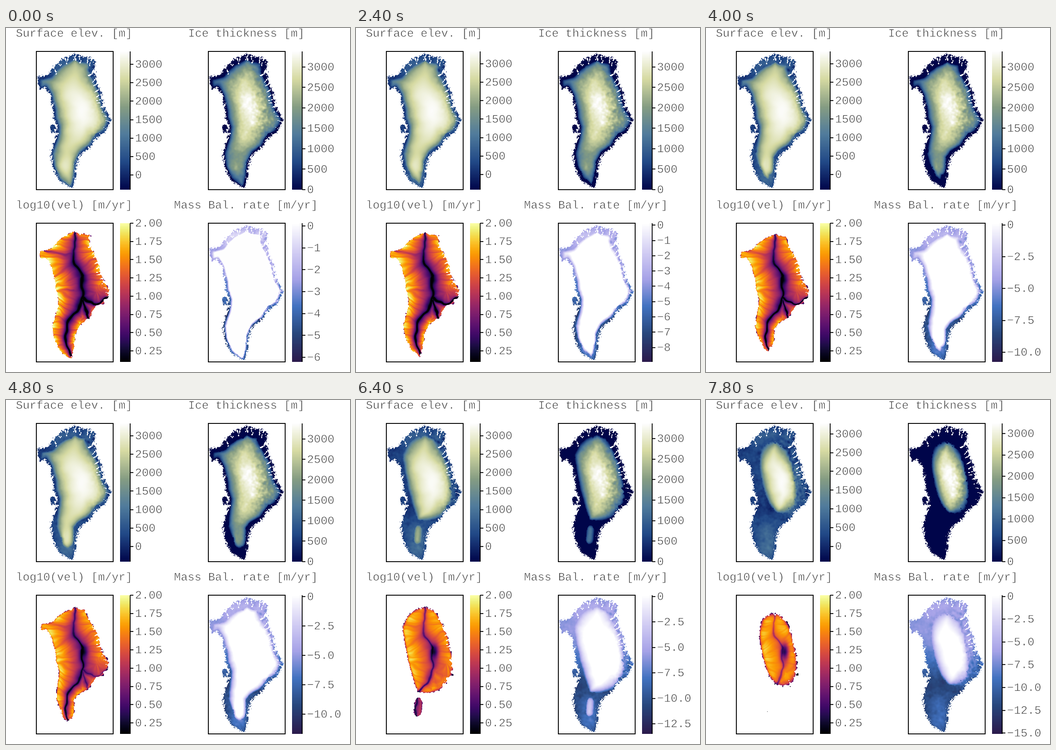
A matplotlib script for the animation above (8000 ms loop, 748 by 749 pixels).

```python
import numpy as np
import matplotlib.pyplot as plt
import matplotlib.patheffects as pe
from matplotlib.animation import FuncAnimation
from matplotlib.colors import LinearSegmentedColormap
from matplotlib.patches import Rectangle
from matplotlib.path import Path

WIDTH, HEIGHT, DPI = 748, 749, 64
FRAMES, INTERVAL = 40, 200
NX, NY = 167, 301
PT = 72 / DPI
INK = "#383838"
GLACIER = LinearSegmentedColormap.from_list("glacier", [
    "#00054a", "#214987", "#507b9c", "#869d83", "#d6daa2", "#fefefe"])
MELT = LinearSegmentedColormap.from_list("melt", [
    "#2c1a4c", "#28467b", "#4272c0", "#a7a3e8", "#d4cff4", "#ffffff"])

rng = np.random.default_rng(11)
X, Y = np.meshgrid(np.arange(NX) + 0.5, np.arange(NY) + 0.5)


# --- field helpers ----------------------------------------------------------
def trace(pts, x=X, y=Y):
    """Distance to a polyline and a coordinate running across its normals."""
    best, lane, run = np.full(X.shape, np.inf), np.zeros(X.shape), 0.0
    for (x0, y0), (x1, y1) in zip(pts, pts[1:]):
        dx, dy = x1 - x0, y1 - y0
        length = np.hypot(dx, dy)
        f = np.clip(((x - x0) * dx + (y - y0) * dy) / length**2, 0, 1)
        ex, ey = x - x0 - f * dx, y - y0 - f * dy
        d = np.hypot(ex, ey)
        q = run + f * length + 25 * np.arcsin(ey / (d + 1e-6)) + 37 * (ex > 0)
        lane = np.where(d < best, q, lane)
        best = np.minimum(best, d)
        run += length
    return best, lane


def inside(pts):
    """Signed distance to a polygon, positive inside."""
    d, _ = trace(pts + pts[:1])
    hit = Path(pts).contains_points(np.c_[X.ravel(), Y.ravel()])
    return np.where(hit.reshape(X.shape), d, -d)


def blur(a, sigma):
    fy, fx = np.fft.fftfreq(NY)[:, None], np.fft.fftfreq(NX)[None, :]
    kernel = np.exp(-2 * (np.pi * sigma) ** 2 * (fx**2 + fy**2))
    return np.fft.ifft2(np.fft.fft2(a) * kernel).real


def noise(sigma):
    n = blur(rng.standard_normal(X.shape), sigma)
    return n / n.std()


def bump(cx, cy, sx, sy):
    return np.exp(-((X - cx) / sx) ** 2 - ((Y - cy) / sy) ** 2)


def slope(v, start, end):
    return np.clip((v - start) / (end - start), 0, 1)


# --- land: a rough outline cut by random fjords in the north and east -------
coast = [(3, 56), (28, 49), (33, 38), (51, 19), (66, 13), (85, 3), (97, 10),
         (118, 14), (129, 20), (126, 42), (131, 64), (141, 88), (144, 108),
         (148, 122), (164, 148), (152, 172), (128, 191), (118, 209), (99, 222),
         (88, 243), (86, 270), (79, 297), (70, 297), (48, 280), (35, 252),
         (31, 222), (42, 188), (45, 165), (38, 145), (37, 128), (29, 96),
         (20, 80), (8, 82), (2, 68)]
island = 6 - np.hypot(X - 36, 0.6 * (Y - 167))
mainland = inside(coast)
depth = np.maximum(mainland, island)
shore = depth + 1.3 * noise(1.2) + 1.3 * noise(0.5)
for (x0, y0), (x1, y1) in zip(coast[2:15], coast[3:16]):
    for f in (0.25, 0.75):
        px, py = x0 + f * (x1 - x0), y0 + f * (y1 - y0)
        heading = np.arctan2(130 - py, 75 - px) + rng.normal(0, 0.3)
        reach = rng.uniform(8, 18)
        tip = (px + reach * np.cos(heading), py + reach * np.sin(heading))
        shore = np.minimum(shore, trace([(px, py), tip])[0] + 0.6 * noise(1))
land = shore > 0.7

north, south = slope(Y, 75, 35), slope(Y, 190, 250)
east = slope(X, 90, 125)

bed = (300 - 450 * bump(82, 115, 20, 60) + 600 * bump(128, 150, 20, 65)
       + 600 * bump(68, 262, 22, 45) + 350 * bump(60, 25, 60, 18)
       - 250 * bump(60, 180, 18, 22) + 60 * noise(5)
       + (55 + 140 * east) * noise(1.8))
bed *= 1 - 0.5 * np.exp(-np.clip(depth, 0, None) / 5)

# highest ice along the divide, with a second dome in the south
crest = (1900 + 1400 * np.exp(-((Y - 130) / 95) ** 2)
         + 700 * np.exp(-((Y - 252) / 25) ** 2))
ragged = 0.7 * noise(1) + (0.6 + 1.4 * east) * noise(2.5)

# --- divides and streams ----------------------------------------------------
warped = X + 2 * noise(6), Y + 2 * noise(6)
divide = [(89, 13), (79, 60), (80, 82), (102, 115), (102, 160), (84, 195),
          (70, 217), (66, 260), (74, 285)]
spurs = [[(102, 163), (122, 173), (140, 170), (156, 158)],
         [(103, 168), (108, 195), (116, 207)]]
ridge, lane = trace(divide, *warped)
spur = np.full(X.shape, np.inf)
for line in spurs:
    d_line, q_line = trace(line, *warped)
    lane = np.where(d_line < np.minimum(ridge, spur), q_line, lane)
    spur = np.minimum(spur, d_line)
streaks = (np.sin(0.2 * lane) + 0.7 * np.sin(0.47 * lane + 1)
           + 0.5 * np.sin(0.95 * lane + 2)) / 1.9
crease = (0.8 * np.exp(-(trace([(79, 70), (19, 63)], *warped)[0] / 3) ** 2)
          + 0.5 * np.exp(-(trace([(84, 145), (39, 143)], *warped)[0] / 2) ** 2))


def dome(t):
    """Tilted superellipse to which the ice sheet finally shrinks."""
    long, short = 87 - 10 * (t - 7), 42 - 7 * (t - 7)
    c, s = np.cos(0.2), np.sin(0.2)
    a, b = s * (X - 91) + c * (Y - 118), c * (X - 91) - s * (Y - 118)
    rho = (np.abs(a / long) ** 2.4 + np.abs(b / short) ** 2.4) ** (1 / 2.4)
    return (1 - rho) * short


def margin(t):
    """Signed distance to the ice edge and the radius of the southern lobe."""
    melt = min(1, (t / 4.8) ** 2)
    inset = mainland - 4 - 8 * north - melt * (1 + 7 * north + 13 * south)
    d = inset + (dome(t) - inset) * slope(t, 4.8, 7)
    gone = slope(t, 5.2, 7.2)
    r = 14 * (1 - gone) ** 0.5 - 0.5
    lobe = [(70, 200 + 50 * gone), (68, 257 - 4 * gone)]
    return np.maximum(d, r - trace(lobe)[0]), r


def fields(t):
    late = t / 7.8
    d, r = margin(t)
    ice = land & (d + ragged > 0)
    dm = np.clip(d + 1, 0, None) * ice
    fade = np.where(Y > 215, min(1, (max(r, 0) / 10) ** 2), 1)

    u = np.clip(blur(dm / (dm + ridge + 1), 1.5), 0, 1)
    p = np.sqrt(1 - (1 - u) ** 2) * (1 - np.exp(-dm / 3)) * fade
    thick = np.clip((crest * (1 - 0.015 * late**3) - bed) * p, 0, None)
    surf = bed + thick

    split = np.clip(np.minimum(ridge, spur + 30 * late**6) - 1.5, 0, None)
    w = split / (dm + split + 0.5)
    floor = 0.3 * slope(Y, 100, 60) + 0.9 * late**3
    vel = floor + (1.8 - floor) * w ** (0.55 - 0.2 * late**2)
    vel += (0.4 - 0.2 * late) * streaks * w**1.5 - 0.2 * east * w
    vel -= crease * w * (1 - 0.8 * late) + 0.9 * late**2 * bump(106, 123, 8, 20)
    vel *= (1 - np.exp(-(dm + 0.3) / (0.5 + 1.8 * late**2))) * fade

    warm = slope(Y, 90, 200)
    line = 1000 + 210 * t + 350 * warm
    rate = np.minimum(0.1, (surf - line) * (0.0028 + 0.0016 * warm))
    return [np.where(land, surf, np.nan), np.where(land, thick, np.nan),
            np.where(ice, np.clip(vel, 0.1, 2), np.nan),
            np.where(land, rate, np.nan)]


def limits(t):
    dip, thin = 13 * slope(t, 1.2, 2.4), (t / 7.8) ** 12
    return [(-398 - dip, 3349 - dip - 54 * thin), (0, 3382 - 145 * thin),
            (0.1, 2.0), (-6.21 - 1.138 * t, 0.128)]


# --- stage ------------------------------------------------------------------
fig = plt.figure(figsize=(WIDTH / DPI, HEIGHT / DPI), dpi=DPI, facecolor="white")
ax = fig.add_axes([0, 0, 1, 1])
ax.axis("off")


def write(x, y, s="", **kw):
    thin = [pe.Stroke(linewidth=0.8, foreground="white")]
    return ax.text(x, y, s, family="Liberation Mono", fontsize=24.8 * PT,
                   color=INK, va="baseline", path_effects=thin, **kw)


class Panel:
    def __init__(self, title, cx, x, y0, y1, bar, cmap):
        self.y0, self.y1, self.axis = y0, y1, bar + 22.5
        look = dict(cmap=cmap, aspect="auto", interpolation="nearest")
        self.map = ax.imshow(np.full(X.shape, np.nan),
                             extent=(x, x + NX, y1, y0), **look)
        ax.imshow(np.linspace(1, 0, 256)[:, None],
                  extent=(bar, bar + 23, y1, y0), **look)
        ax.add_patch(Rectangle((x, y0), NX, y1 - y0, fill=False, ec="black",
                               lw=1.9 * PT, zorder=3))
        ax.plot([self.axis] * 2, [y0, y1], color="black", lw=1.8 * PT,
                solid_capstyle="butt", zorder=3)
        self.ticks = ax.hlines([], 0, 1, color="black", lw=1.8 * PT, zorder=3)
        self.labels = [write(bar + 32.5, 0) for _ in range(12)]
        write(cx, y0 - 32, title, ha="center")

    def show(self, data, lo, hi, step, style):
        self.map.set_data(data)
        self.map.set_clim(lo, hi)
        first, last = np.ceil(lo / step - 1e-9), np.floor(hi / step + 1e-9)
        values = np.arange(first, last + 1) * step
        ys = self.y1 - (values - lo) / (hi - lo) * (self.y1 - self.y0)
        self.ticks.set_segments([[(self.axis, y), (self.axis + 7, y)] for y in ys])
        for text in self.labels:
            text.set_visible(False)
        for text, v, y in zip(self.labels, values, ys):
            text.set_text((style % v).replace("-", "\u2212") if v else "0")
            text.set_y(y + 7.5)
            text.set_visible(True)


panels = [
    Panel("Surface elev. [m]", 148, 66, 51, 352, 248, GLACIER),
    Panel("Ice thickness [m]", 522.5, 440, 51, 352, 622, GLACIER),
    Panel("log10(vel) [m/yr]", 148, 66, 425, 727, 248, "inferno"),
    Panel("Mass Bal. rate [m/yr]", 521.5, 440, 425, 727, 622, MELT)]
ax.set_xlim(0, WIDTH)
ax.set_ylim(HEIGHT, 0)


def draw(n):
    t = n * INTERVAL / 1000
    spans = limits(t)
    rate_scale = (2.5, "%.1f") if spans[3][0] < -10 else (1, "%d")
    scales = [(500, "%d"), (500, "%d"), (0.25, "%.2f"), rate_scale]
    for panel, data, span, scale in zip(panels, fields(t), spans, scales):
        panel.show(data, *span, *scale)
    return []


anim = FuncAnimation(fig, draw, frames=FRAMES, interval=INTERVAL, repeat=True,
                     init_func=lambda: draw(0), blit=False)
plt.show()
```
